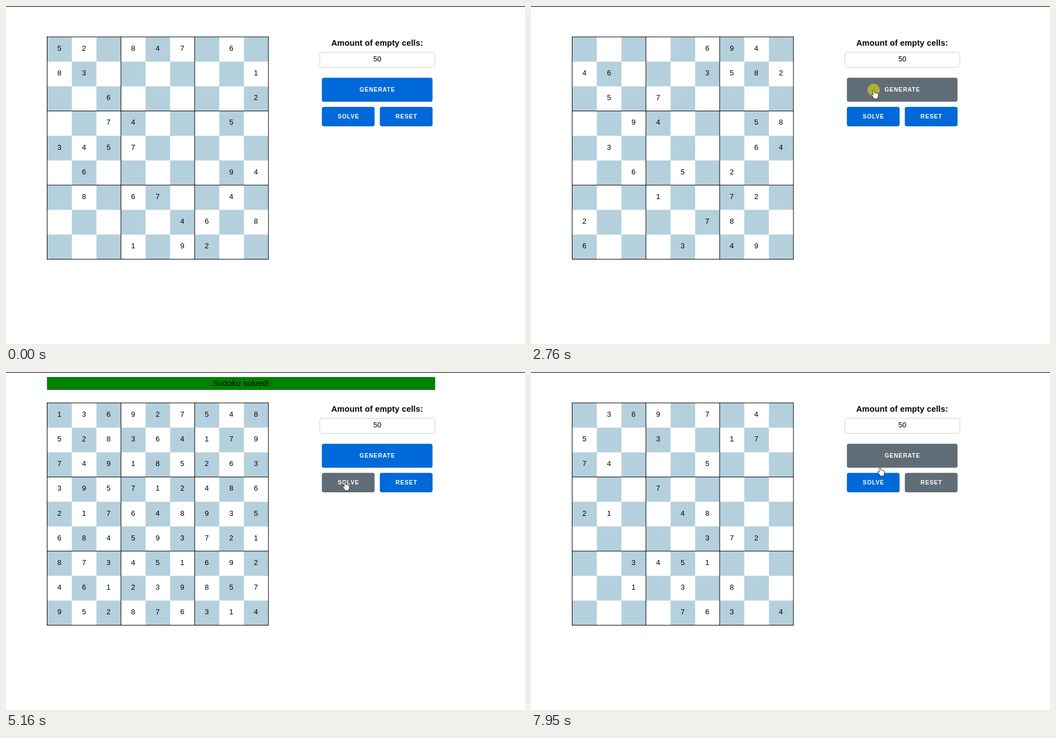
An HTML page that plays this animation: 927x604 px, repeating every 8 s.

```html
<!DOCTYPE html>
<html lang="en">
<head>
<meta charset="utf-8">
<title>Sudoku</title>
<style>
  html, body { margin: 0; width: 100%; height: 100%; overflow: hidden; background: #fff; }
  svg { display: block; width: 100%; height: 100%; }
  text { font-family: "Liberation Sans", Arial, sans-serif; text-anchor: middle; fill: #000; }
  .digit { font-size: 13px; }
  .label { font-size: 14.55px; letter-spacing: .146px; }
  .button { font-size: 10.3px; font-weight: bold; letter-spacing: .9px; fill: #fff; }
</style>
</head>
<body>
<svg id="stage" viewBox="0 0 927 604"></svg>
<script>
const LOOP = 8000, PRESS = 140, LAG = 50;
const BLUE = '#0069d9', GREY = '#606c76';
const stage = document.getElementById('stage');

function add(tag, attrs, parent = stage, text = '') {
  const node = document.createElementNS('http://www.w3.org/2000/svg', tag);
  for (const key in attrs) node.setAttribute(key, attrs[key]);
  node.textContent = text;
  parent.appendChild(node);
  return node;
}
const rect = (x, y, width, height, fill, more = {}, parent = stage) =>
  add('rect', { x, y, width, height, fill, ...more }, parent);
const label = (x, y, text, cls, more = {}, parent = stage) =>
  add('text', { x, y, class: cls, ...more }, parent, text);
const show = (node, on) => node.setAttribute('visibility', on ? 'visible' : 'hidden');

// The given digits of each puzzle, row by row
const puzzles = [
  '52.847.6. 83......1 ..6.....2 ..74...5. 3457..... .6.....94 .8.67..4. .....46.8 ...1.92..',
  '.....694. 46...3582 .5.7..... ..94...58 .3.....64 ..6.5.2.. ...1..72. 2....78.. 6...3.49.',
  '...7..485 8.5....6. .49....3. ..3.7..4. 19..5.... ......51. .3.28.6.4 .2.14..73 .8.3.7...',
  '.369.7.4. 5..3..17. 74...5... ...7..... 21..48... .....372. ..3451... ..1.3.8.. ....763.4'
].map(rows => rows.replaceAll(' ', ''));

const row = i => Math.floor(i / 9), col = i => i % 9;
const block = i => Math.floor(row(i) / 3) * 3 + Math.floor(col(i) / 3);

// Backtracking over the empty cells in reading order
function solved(cells) {
  const i = cells.indexOf('.');
  if (i < 0) return cells;
  const used = new Set([...cells].filter((_, j) =>
    row(j) === row(i) || col(j) === col(i) || block(j) === block(i)));
  for (let n = 1; n <= 9; n++) {
    if (used.has(String(n))) continue;
    const found = solved(cells.slice(0, i) + n + cells.slice(i + 1));
    if (found) return found;
  }
  return null;
}

// Board
rect(0, 0, 927, 1.4, '#404040');
const digits = puzzles[0].split('').map((_, i) => {
  if (i % 2 === 0) rect(73.7 + col(i) * 43.9, 55.3 + row(i) * 44.14, 43.9, 44.14, '#b5d0dd');
  return label(95.4 + col(i) * 43.87, Math.round(80 + row(i) * 44.13), '', 'digit');
});
for (let i = 0; i < 4; i++) {
  rect(73 + i * 131.75, 54.7, 1, 398.3, '#000');
  rect(73, 54.7 + i * 132.43, 396.2, 1, '#000');
}

// Controls
label(663, 71, 'Amount of empty cells:', 'label', { 'font-weight': 'bold' });
rect(560.5, 82.5, 205.5, 27, '#fff', { rx: 3.6, stroke: '#d1d1d1' });
label(663.3, 99, '50', 'digit');

function button(x, y, w, h, text) {
  const box = rect(x, y, w, h, BLUE, { rx: 3.6 });
  label(x + w / 2 + .45, Math.round(y + h / 2 + 3.5), text, 'button');
  const hit = (px, py) => px >= x && px <= x + w && py >= y && py <= y + h;
  return { box, hit };
}
const generate = button(564.2, 128.2, 197.6, 42.8, 'GENERATE');
const solve = button(564.2, 180.2, 94.2, 34.7, 'SOLVE');
const reset = button(667.7, 180.2, 94.2, 34.7, 'RESET');
const buttons = [generate, solve, reset];

const banner = add('g');
rect(73.2, 9, 693.3, 23, '#008000', {}, banner);
label(419.8, 25, 'Sudoku solved!', 'label', {}, banner);

// Pointer, with its hot spot at the local zero point
const pointer = add('g');
const halo = add('circle', { r: 11, fill: '#f0f000', 'fill-opacity': .52 }, pointer);
const shape = (d, stroke) => add('path', { d, fill: '#fff', stroke, 'stroke-width': .9, 'stroke-linejoin': 'round' }, pointer);
const arrow = shape('M0 0V11.6L2.7 9.2 4.5 13.5 6.4 12.7 4.6 8.6H8.3Z', '#000');
const hand = shape('M-1 1.3Q.4-.5 1.8 1.3V5.2Q3.2 4.5 4 5.7Q5.6 4.9 6.2 6.3Q8.5 5.9 8.6 7.8V11.3L7.2 13.8V16H0V14.2L-3.6 9.4Q-3.9 7.5-2.6 7.8L-1 9.2Z', '#222');

// Pointer path: time, x, y
const path = [
  [840, 864, 536], [1260, 740, 168], [1330, 721, 147], [1470, 612, 150],
  [4500, 612, 150], [4810, 599, 181], [5020, 605, 196],
  [5960, 605, 196], [6240, 665, 158], [6450, 711, 174], [6520, 714, 197],
  [7460, 714, 197], [7670, 685, 162], [7950, 623, 170]
];
// Each press focuses a button and, on release, shows a board
const clicks = [
  { at: -PRESS, cells: puzzles[0] },
  { at: 1670, on: generate, cells: puzzles[1] },
  { at: 2760, on: generate, cells: puzzles[2] },
  { at: 3990, on: generate, cells: puzzles[3] },
  { at: 5020, on: solve, cells: solved(puzzles[3]) },
  { at: 6720, on: reset, cells: puzzles[3] }
];
const lastClick = t => clicks.filter(c => c.at <= t).pop();

function position(t) {
  const next = path.findIndex(p => p[0] > t);
  if (next < 1) return path.at(next).slice(1);
  const [t0, x0, y0] = path[next - 1], [t1, x1, y1] = path[next];
  const k = (t - t0) / (t1 - t0);
  return [x0 + (x1 - x0) * k, y0 + (y1 - y0) * k];
}

let shown = null;
function draw(t) {
  const pressed = lastClick(t), done = lastClick(t - PRESS);
  if (done !== shown) {
    shown = done;
    digits.forEach((node, i) => node.textContent = done.cells[i].replace('.', ''));
  }
  show(banner, done.on === solve);

  const visible = t >= path[0][0];
  const hovered = visible && buttons.find(b => b.hit(...position(t - LAG)));
  for (const b of buttons)
    b.box.setAttribute('fill', b === hovered || b === pressed.on ? GREY : BLUE);

  show(arrow, visible && !hovered);
  show(hand, visible && (hovered));
  show(halo, pressed !== done);
  pointer.setAttribute('transform', `translate(${position(t)})`);
}

const start = performance.now();
function frame() {
  draw((performance.now() - start) % LOOP);
  requestAnimationFrame(frame);
}
draw(0);
requestAnimationFrame(frame);
</script>
</body>
</html>
```
